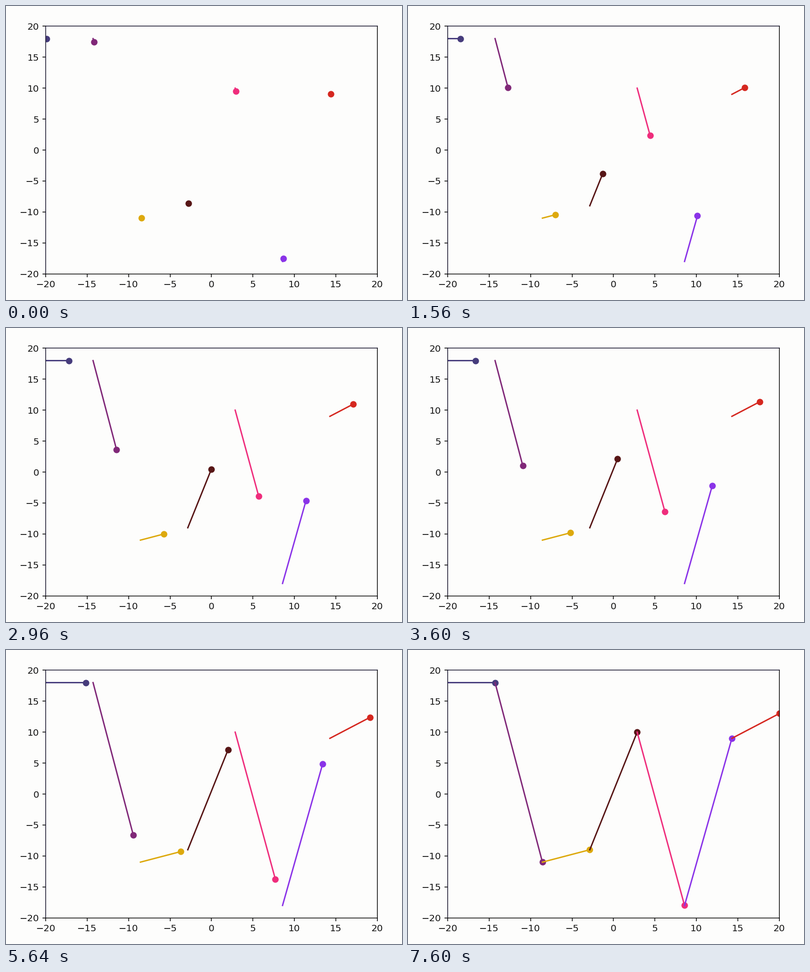
A matplotlib script that plays this animation: 868 px wide and 645 px high, repeating every 7.64 s.

```python
import numpy as np
import matplotlib.pyplot as plt
from matplotlib.animation import FuncAnimation

W, H, DPI = 868, 645, 128
FRAMES, INTERVAL = 191, 40
K = 1.145  # size factor for text, ticks and strokes

COLORS = ["#463c7c", "#802878", "#dda90d", "#571616",
          "#ef2d7c", "#8a33e8", "#d5271f"]
KNOTS_X = np.linspace(-20, 20, len(COLORS) + 1)
KNOTS_Y = np.array([18, 18, -11, -9, 10, -18, 9, 13])

# Progress along each segment: a short pause, a slowing run, a final hold
KEY_FRAMES = [0, 2, 39, 58, 90, 119, 141, 176]
KEY_VALUES = [0.0185, 0.0185, 0.273, 0.4045, 0.586, 0.738, 0.848, 1.0]

fig = plt.figure(figsize=(W / DPI, H / DPI), dpi=DPI, facecolor="#fdfdfc")
ax = fig.add_axes([87 / W, 57.4 / H, 726.8 / W, 543.2 / H],
                  facecolor="#fdfdfc")
ax.set(xlim=(-20, 20), ylim=(-20, 20))
ax.set_xticks(range(-20, 21, 5))
ax.set_yticks(range(-20, 21, 5))
ax.tick_params(labelsize=10 * K, length=3.5 * K, width=0.8 * K, pad=3.5 * K,
               labelfontfamily="DejaVu Sans", labelcolor="#141414")
for side, spine in ax.spines.items():
    spine.set_linewidth(0.8 * K)
    spine.set_color("#19172f" if side in ("left", "top") else "#0c0c0c")

trails, dots = [], []
for color in COLORS:
    trails += ax.plot([], [], color=color, lw=1.5 * K, snap=False)
    dots += ax.plot([], [], "o", color=color, ms=6 * K, mew=K, snap=False)


def update(frame):
    p = np.interp(frame, KEY_FRAMES, KEY_VALUES)
    xs = KNOTS_X[:-1] + p * np.diff(KNOTS_X)
    ys = KNOTS_Y[:-1] + p * np.diff(KNOTS_Y)
    for i, (trail, dot) in enumerate(zip(trails, dots)):
        trail.set_data([KNOTS_X[i], xs[i]], [KNOTS_Y[i], ys[i]])
        dot.set_data([xs[i]], [ys[i]])
    return trails + dots


anim = FuncAnimation(fig, update, frames=FRAMES, interval=INTERVAL,
                     init_func=lambda: update(0), repeat=True, repeat_delay=0)
plt.show()
```
